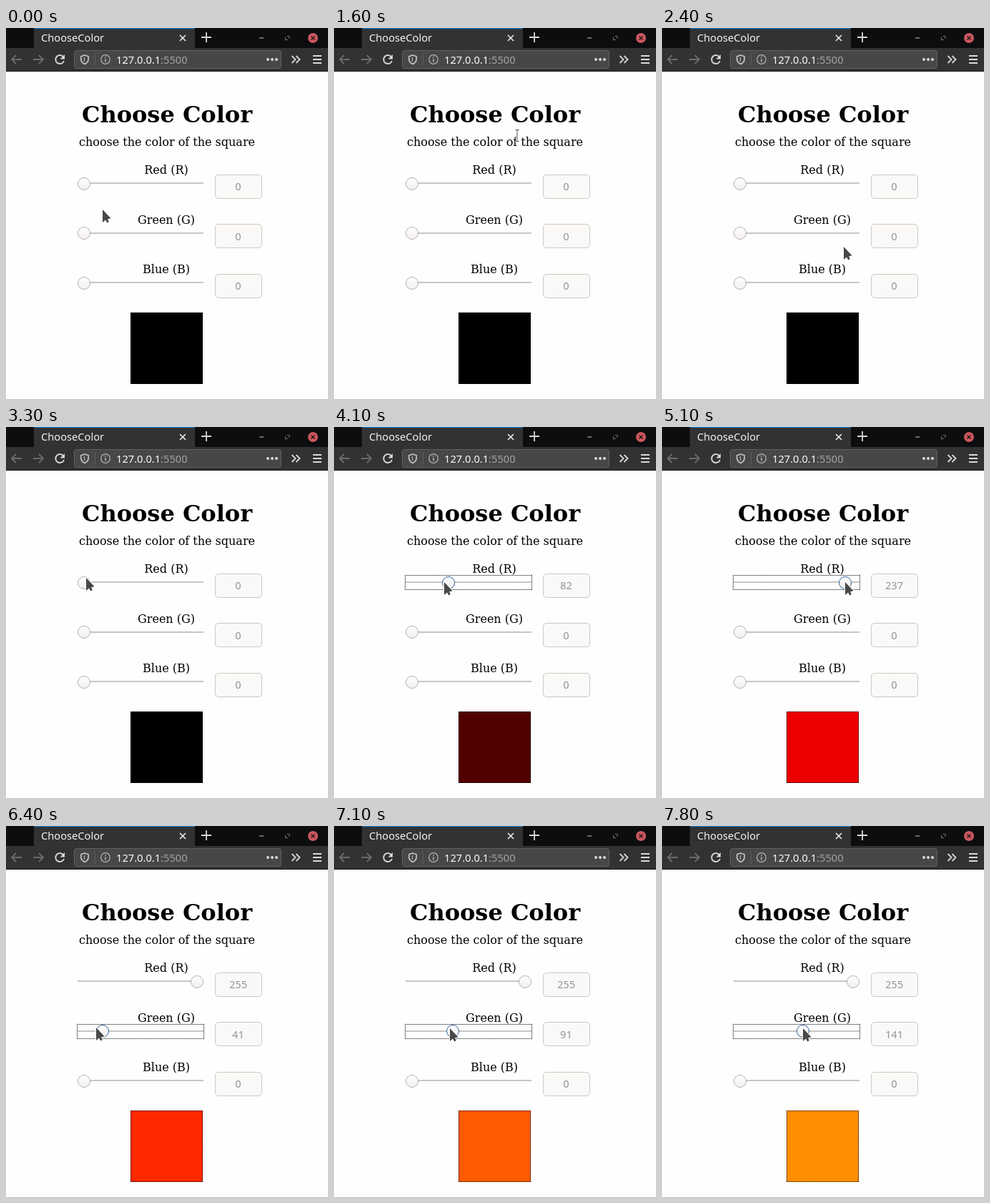
Recreate the animation shown at these times as an HTML page with a canvas. Size 450x519 px, loop 8 s.

```html
<!DOCTYPE html>
<html lang="en">
<head>
<meta charset="utf-8">
<title>ChooseColor</title>
<style>
  html, body { margin: 0; width: 100%; height: 100%; overflow: hidden; background: #fefefe; }
  canvas { display: block; }
</style>
</head>
<body>
<canvas id="stage" width="450" height="519"></canvas>
<script>
const ctx = document.getElementById('stage').getContext('2d');
const LOOP = 8000, STEP = 100;
const SERIF = '"DejaVu Serif", serif';
const SANS = '14.667px "Noto Sans", "Open Sans", sans-serif';
const LIGHT = '#d8d8d9', DIM = '#6c6c6e';
const GRAB_RED = 3400, LEAVE_RED = 5600, GRAB_GREEN = 6300;

// Turning points of the pointer: time, x, y
const PATH = [
  [0, 135, 254], [500, 131, 252], [800, 168, 240], [1000, 147, 241],
  [1200, 185, 235], [1600, 256, 150], [1900, 142, 230], [2200, 314, 345],
  [2900, 104, 208], [3300, 112, 211], [4100, 154, 217], [5100, 256, 217],
  [5200, 277, 220], [5700, 273, 222], [5800, 150, 266], [6200, 108, 275],
  [6400, 126, 282], [7800, 197, 283]
];
// Slider drags: time, value
const RED = [[GRAB_RED, 0], [4100, 82], [5100, 237], [5200, 255]];
const GREEN = [[GRAB_GREEN, 0], [6400, 41], [7800, 141]];

// Linear motion through the points, rounded to whole units
function along(points, t) {
  const next = points.findIndex(p => p[0] > t);
  if (next < 0) return points[points.length - 1].slice(1);
  if (next === 0) return points[0].slice(1);
  const a = points[next - 1], b = points[next];
  const k = (t - a[0]) / (b[0] - a[0]);
  return a.slice(1).map((v, i) => Math.round(v + (b[i + 1] - v) * k));
}

function rect(x, y, w, h, color) {
  ctx.fillStyle = color;
  ctx.fillRect(x, y, w, h);
}

function text(str, x, y, font, color, align = 'center') {
  ctx.font = font;
  ctx.fillStyle = color;
  ctx.textAlign = align;
  ctx.fillText(str, x, y);
}

function stroke(d, color, width = 1) {
  ctx.strokeStyle = color;
  ctx.lineWidth = width;
  ctx.stroke(new Path2D(d));
}

function fill(d, color) {
  ctx.fillStyle = color;
  ctx.fill(new Path2D(d));
}

function disc(x, y, r, color) {
  ctx.fillStyle = color;
  ctx.beginPath();
  ctx.arc(x, y, r, 0, Math.PI * 2);
  ctx.fill();
}

function box(x, y, w, h, r, color, edge) {
  ctx.beginPath();
  ctx.roundRect(x, y, w, h, r);
  ctx.fillStyle = color;
  ctx.fill();
  ctx.strokeStyle = edge;
  ctx.lineWidth = 1;
  ctx.stroke();
}

// One-pixel dotted frame on whole pixels
function dotted(x, y, w, h) {
  for (let i = 0; i < w; i += 2) {
    rect(x + i, y, 1, 1, '#000');
    rect(x + i, y + h - 1, 1, 1, '#000');
  }
  for (let i = 0; i < h; i += 2) {
    rect(x, y + i, 1, 1, '#000');
    rect(x + w - 1, y + i, 1, 1, '#000');
  }
}

function drawTabs() {
  rect(0, 0, 450, 28, '#0c0d0f');
  rect(39, 0, 225, 28, '#323234');
  rect(39, 0, 225, 1, '#0f80e0');
  text('ChooseColor', 49, 19, SANS, '#f4f4f5', 'left');
  stroke('M243 10l8 8m0 -8l-8 8', '#e8e8e9', 1.7);
  stroke('M273 13h14m-7 -7v14', LIGHT, 1.8);
  stroke('M354 14h6', '#8b8b8d', 1.5);
  stroke('M390.5 13v3.5h3.5M392.5 11.5h3.5v3.5', '#6d6d6f', 1.2);
  disc(429, 14, 7, '#cc575d');
  stroke('M426.5 11.5l5 5m0 -5l-5 5', '#26181a', 1.5);
}

function drawToolbar() {
  rect(0, 28, 450, 33, '#323234');
  rect(0, 60, 450, 1, '#161618');
  stroke('M22 44h-14m6 -6l-6 6l6 6', DIM, 1.8);
  stroke('M38 44h14m-6 -6l6 6l-6 6', DIM, 1.8);
  stroke('M80.5 41A6 6 0 1 0 81 46', LIGHT, 1.9);
  fill('M82 37v6.5h-6.5z', LIGHT);

  box(95.5, 31.5, 289, 25, 3, '#474749', '#606063');
  stroke('M110 38l5.2 1.8v3.4c0 3.2 -2 5.8 -5.2 7.3c-3.2 -1.5 -5.2 -4.1 -5.2 -7.3v-3.4z', '#c4c4c5', 1.7);
  stroke('M109.5 41v6', '#c4c4c5', 1);
  stroke('M124.5 35v18', '#5c5c5f');
  stroke('M132.7 44a6.3 6.3 0 1 0 12.6 0a6.3 6.3 0 1 0 -12.6 0', '#b4b4b6', 1.2);
  stroke('M139 43v4.5M139 40v1.6', '#b4b4b6', 1.5);
  text('127.0.0.1', 154, 50, SANS, '#f9f9fa', 'left');
  text(':5500', 154 + ctx.measureText('127.0.0.1').width, 50, SANS, '#a2a2a4', 'left');
  for (let x = 366; x <= 378; x += 6) disc(x, 44, 2, LIGHT);
  stroke('M399.5 39l5 5l-5 5m6 -10l5 5l-5 5', LIGHT, 1.8);
  stroke('M429 39h12m-12 5h12m-12 5h12', LIGHT, 1.8);
}

function drawSlider(label, y, thumbY, value, focused, active) {
  text(label, 224, y - 13, '16px ' + SERIF, '#000');
  rect(100, y - 1, 176, 2, '#c9c5c2');
  if (focused) dotted(99, y - 10, 178, 21);

  const x = 109 + Math.ceil(value / 255 * 158);
  const shade = ctx.createLinearGradient(0, thumbY - 9, 0, thumbY + 9);
  shade.addColorStop(0, '#fff');
  shade.addColorStop(1, '#f1efee');
  box(x - 8.5, thumbY - 8.5, 17, 17, 8.5, shade, active ? '#2f6297' : '#b7b0ab');

  box(292.5, thumbY - 12.5, 65, 33, 4.5, '#faf9f8', '#cdc7c2');
  text(value, 324.5, y + 10, SANS, '#929595');
}

function drawArrow(x, y) {
  ctx.save();
  ctx.translate(x, y);
  ctx.lineJoin = 'round';
  const shape = 'M0 0V18L4 14.5L6.3 18.5L8.7 17.3L7.2 13.2L11.5 12.3Z';
  stroke(shape, 'rgba(255,255,255,0.9)', 2);
  fill(shape, '#484848');
  ctx.restore();
}

function drawBeam(x, y) {
  const d = `M${x - 2.5} ${y - 7.5}h5m-2.5 0v16m-2.5 0h5`;
  stroke(d, 'rgba(255,255,255,0.9)', 3);
  stroke(d, '#555');
}

function draw(t) {
  const [red] = along(RED, t);
  const [green] = along(GREEN, t);
  const [x, y] = along(PATH, t);
  const onGreen = t >= GRAB_GREEN;
  const onRed = t >= GRAB_RED && !onGreen;

  rect(0, 0, 450, 519, '#fefefe');
  drawTabs();
  drawToolbar();
  text('Choose Color', 225, 132, 'bold 32px ' + SERIF, '#000');
  text('choose the color of the square', 225, 165, '16px ' + SERIF, '#000');
  drawSlider('Red (R)', 217, 218, red, onRed, onRed && t < LEAVE_RED);
  drawSlider('Green (G)', 287, 287, green, onGreen, onGreen);
  drawSlider('Blue (B)', 356, 357, 0, false, false);
  rect(174, 398, 101, 100, `rgb(${red},${green},0)`);
  dotted(174, 398, 101, 100);

  const overHeading = y < 168;
  if (overHeading) drawBeam(x, y);
  else drawArrow(x, y);
}

const start = performance.now();
function tick() {
  const t = (performance.now() - start) % LOOP;
  draw(Math.floor(t / STEP) * STEP);
  requestAnimationFrame(tick);
}
tick();
</script>
</body>
</html>
```
